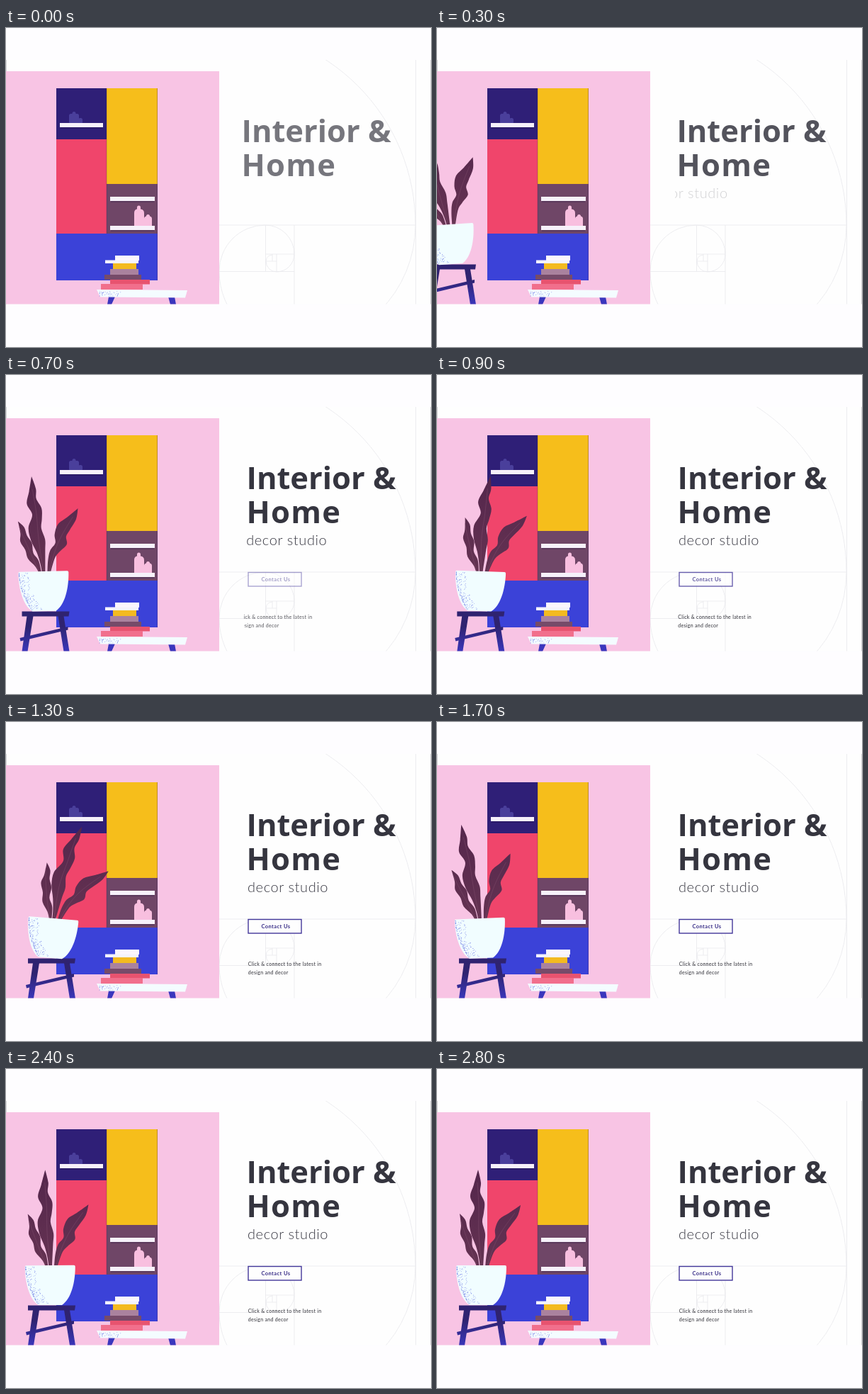
These frames come from a looping animation (600 by 450 pixels, 2900 ms). An HTML page:

```html
<!DOCTYPE html>
<html lang="en">
<head>
<meta charset="utf-8">
<title>Interior &amp; Home</title>
<style>
html, body { margin: 0; width: 100%; height: 100%; overflow: hidden; background: #fefdff; }
svg { display: block; width: 600px; height: 450px; }
.head { font: 700 43.5px "Open Sans", sans-serif; fill: #35353f; }
.sub { font: 300 20px Lato, sans-serif; letter-spacing: .6px; fill: #3a3a44; }
.note { font: 400 7px Lato, sans-serif; letter-spacing: .3px; fill: #2e2e36; }
.btn { font: 700 7.5px Lato, sans-serif; letter-spacing: .4px; fill: #352a86; }
</style>
</head>
<body>
<svg viewBox="0 0 600 450" xmlns="http://www.w3.org/2000/svg">
  <defs>
    <clipPath id="page"><rect y="45" width="600" height="344.5"/></clipPath>
    <clipPath id="room"><rect y="61" width="301" height="328.5"/></clipPath>
    <clipPath id="copy"><rect x="336" y="215" width="264" height="174"/></clipPath>
    <linearGradient id="leg" x1="0" y1="340" x2="0" y2="389" gradientUnits="userSpaceOnUse">
      <stop offset=".3" stop-color="#2f2370"/><stop offset="1" stop-color="#3a36b8"/>
    </linearGradient>
    <linearGradient id="leaf" x1="0" y1="145" x2="0" y2="280" gradientUnits="userSpaceOnUse">
      <stop offset="0" stop-color="#54264c"/><stop offset="1" stop-color="#653352"/>
    </linearGradient>
  </defs>

  <rect width="600" height="450" fill="#fefdff"/>
  <g clip-path="url(#page)">
    <rect y="45" width="600" height="345" fill="#fefefe"/>
    <g fill="none" stroke="#e9e9ec" stroke-width=".8">
      <path d="M300 0A278 278 0 0 1 578 278A171 171 0 0 1 407 449A106 106 0 0 1 301 343A65 65 0 0 1 366 278A41 41 0 0 1 407 319A25 25 0 0 1 382 344A15 15 0 0 1 367 329A9 9 0 0 1 376 320"/>
      <path d="M301 278H578M578.5 45V390M407 278V390M301 343.5H407M366.500 278V343M366 319H407M382 319V343M366 329H382M376 319V329"/>
    </g>
    <path d="M.5 45V390M599.5 45V390" stroke="#d6d6da"/>
  </g>

  <g clip-path="url(#room)">
    <rect y="61" width="301" height="329" fill="#f8c4e4"/>
    <g id="wall"></g>
    <g fill="#4a3f9b">
      <rect x="89" y="121" width="14" height="14" rx="2.500"/><circle cx="96" cy="120.500" r="2.500"/>
      <rect x="102" y="127" width="6" height="8" rx="2.500"/>
    </g>
    <g fill="#f8bfdf">
      <path d="M181 280V261Q181 256 185 255.500V253Q185 250.500 187.500 250.500T190 253V255.500Q195 256 195 261V280Z"/>
      <path d="M195 280V269Q195 266 198 265.500Q198 263 200.500 263T203 265.500Q206 266 206 269V280Z"/>
    </g>
    <g id="boards"></g>
    <path d="M145 379H154L149 390H143ZM229 379H238L240 390H232Z" fill="#3a36bd"/>
    <path d="M128 369L256 370L253 380.500L133 379.500Z" fill="#f4fcff"/>
    <g id="grain" fill="#6270e2"></g>
    <g id="plant">
      <g fill="url(#leg)">
        <path d="M38 340H47L39 390H31ZM82 340H90L98 390H90Z"/>
        <path d="M28 371L96 355V359.500L29 375.500Z"/>
        <path d="M31 333.500H98L97 340.500H31Z" fill="#2f2370"/>
      </g>
      <g id="leaves" fill="url(#leaf)"></g>
      <g id="pot">
        <path d="M27 279Q27 277 29 277H96Q98 277 98 279C98 301 92 325 79 333H46C34 326 27 303 27 279Z" fill="#f1fdff"/>
      </g>
    </g>
  </g>

  <g id="head" class="head">
    <text x="339.500" y="160.500">Interior &amp;</text>
    <text x="339.500" y="209" letter-spacing="1.300">Home</text>
  </g>
  <g clip-path="url(#copy)">
    <text id="sub" class="sub" x="341" y="239.500">decor studio</text>
    <g id="note" class="note">
      <text x="341.700" y="343.500">Click &amp; connect to the latest in</text>
      <text x="341.700" y="355.500">design and decor</text>
    </g>
  </g>
  <g id="btn">
    <rect x="342" y="278.500" width="75" height="19.500" fill="#fefefe" stroke="#43379a" stroke-width="1.400"/>
    <text class="btn" x="360.500" y="291">Contact Us</text>
  </g>
</svg>
<script>
const LOOP = 2900, STEP = 100;
const $ = id => document.getElementById(id);

function add(parent, tag, attrs) {
  const el = document.createElementNS("http://www.w3.org/2000/svg", tag);
  for (const key in attrs) el.setAttribute(key, attrs[key]);
  return parent.appendChild(el);
}
function box(parent, x, y, x2, y2, fill) {
  return add(parent, "rect", { x, y, width: x2 - x, height: y2 - y, fill });
}

const wall = $("wall"), boards = $("boards");
box(wall, 71, 85, 142, 157.5, "#2f1f77");
box(wall, 142, 85, 214, 220.5, "#f6be1b");
box(wall, 71, 157, 142, 290, "#f0456b");
box(wall, 142, 220, 214, 290, "#6f4667");
box(wall, 71, 290, 214, 356, "#3b42d8");
for (const [x, y, y2] of [[141.5, 85, 290], [213, 85, 356]])
  box(wall, x, y, x + 1, y2, "#3b2058").setAttribute("opacity", .3);

for (const [x, y, x2] of [[76, 134, 137], [147, 238, 210], [147, 279, 210]]) {
  box(boards, x + 1, y + 6, x2 - 1, y + 8, "#20103f").setAttribute("opacity", .25);
  box(boards, x, y, x2, y + 6, "#f6f1fa");
}
for (const [x, y, x2, y2, fill] of [
  [154, 321, 188, 328, "#fbf6fc"], [140, 327.5, 187, 332, "#f4f3fd"],
  [151, 332, 184, 340, "#f3ba20"], [147, 340, 187, 348, "#aa829e"],
  [139, 348, 191, 355, "#764b69"], [147, 355, 203, 361.5, "#e8536f"],
  [134, 361, 193, 369, "#f16f8c"]
]) box(boards, x, y, x2, y2, fill);

let seed = 7;
const rand = () => (seed = seed * 16807 % 2147483647) / 2147483647;
function dot(parent, x, y) {
  add(parent, "circle", { cx: x.toFixed(1), cy: y.toFixed(1), r: .45, fill: "#6270e2" });
}
for (let i = 0; i < 45; i++) dot($("grain"), 132 + 30 * rand() ** 2, 371 + 8 * rand());
for (let i = 0; i < 180; i++) {
  const v = rand();
  dot($("pot"), 28 + 17 * v * v + 15 * rand() ** 2.5, 279 + 52 * v);
}

// Outline and vein points of each leaf at rest
const leafData = [
  { edge: [[57, 281], [52, 270], [42, 258], [39, 245], [33, 233], [34, 221], [32, 204],
           [40, 213], [43, 225], [49, 236], [50, 250], [57, 262], [60, 281]],
    vein: [[58, 281], [48, 255], [39, 230], [33, 212]] },
  { edge: [[68, 281], [70, 262], [74, 248], [82, 238], [82, 226], [88, 212], [102, 203], [118, 192],
           [114, 207], [104, 221], [98, 230], [98, 241], [88, 250], [80, 259], [72, 281]],
    vein: [[70, 281], [80, 251], [92, 228], [110, 203]] },
  { edge: [[61, 281], [59, 266], [55, 250], [48, 232], [46, 214], [53, 196], [47, 180], [52, 163], [58, 142],
           [62, 160], [61, 174], [67, 188], [66, 203], [64, 216], [68, 232], [67, 248], [65, 281]],
    vein: [[63, 281], [59, 232], [59, 195], [57, 160]] }
];
const leaves = leafData.map(d => ({
  ...d,
  blade: add($("leaves"), "path", {}),
  rib: add($("leaves"), "path", { fill: "none", stroke: "#8a5673", "stroke-width": .7, opacity: .55 })
}));

// Rounded curve through the points; the tip stays sharp
function curve(pts) {
  let tip = 0;
  pts.forEach((p, i) => { if (p[1] < pts[tip][1]) tip = i; });
  const slope = i => {
    if (i === tip) return [0, 0];
    const a = pts[Math.max(0, i - 1)], b = pts[Math.min(pts.length - 1, i + 1)];
    return [(b[0] - a[0]) / 6, (b[1] - a[1]) / 6];
  };
  let d = "M" + pts[0].map(v => v.toFixed(2));
  for (let i = 1; i < pts.length; i++) {
    const p = pts[i - 1], q = pts[i], m = slope(i - 1), n = slope(i);
    d += "C" + [p[0] + m[0], p[1] + m[1], q[0] - n[0], q[1] - n[1], ...q].map(v => v.toFixed(2));
  }
  return d;
}

const clamp = v => Math.min(1, Math.max(0, v));
const left = (t, start, dur, power) => (1 - clamp((t - start) / dur)) ** power;

const swing = [[0, -15], [400, -15], [1240, 20], [1690, -9], [2120, 4], [2500, -2], [2800, 0], [2900, 0]];
function leanAt(t) {
  const i = swing.findIndex(k => k[0] > t);
  const [t0, a] = swing[i - 1], [t1, b] = swing[i];
  return a + (b - a) * (1 - Math.cos(Math.PI * (t - t0) / (t1 - t0))) / 2;
}

function bend([x, y], lean, shift) {
  const dx = x - 64, dy = y - 280;
  const a = lean * (.6 - .4 * dy / 135) * Math.PI / 180;
  return [64 + shift + dx * Math.cos(a) - dy * Math.sin(a), 280 + dx * Math.sin(a) + dy * Math.cos(a)];
}

const slide = (id, x, alpha) => {
  $(id).setAttribute("transform", `translate(${x.toFixed(2)} 0)`);
  $(id).setAttribute("opacity", clamp(alpha).toFixed(3));
};

function draw(t) {
  const lean = leanAt(t), tilt = lean * .25;
  const shift = 53 * Math.sin(tilt * Math.PI / 180);
  slide("plant", -105 * left(t, 0, 1500, 4), t > 0 ? 1 : 0);
  $("pot").setAttribute("transform", `rotate(${tilt.toFixed(2)} 64 333)`);
  for (const leaf of leaves) {
    leaf.blade.setAttribute("d", curve(leaf.edge.map(p => bend(p, lean, shift))) + "Z");
    leaf.rib.setAttribute("d", curve(leaf.vein.map(p => bend(p, lean, shift))));
  }
  slide("head", -7 * left(t, 0, 500, 2), .67 + t / 1700);
  slide("sub", -64 * left(t, 200, 600, 2), (t - 200) / 450);
  slide("note", -52 * left(t, 400, 600, 2), (t - 300) / 500);
  slide("btn", 0, (t - 440) / 580);
}

function tick() {
  const t = performance.now() % LOOP;
  draw(Math.floor(t / STEP) * STEP);
  requestAnimationFrame(tick);
}
tick();
</script>
</body>
</html>
```
